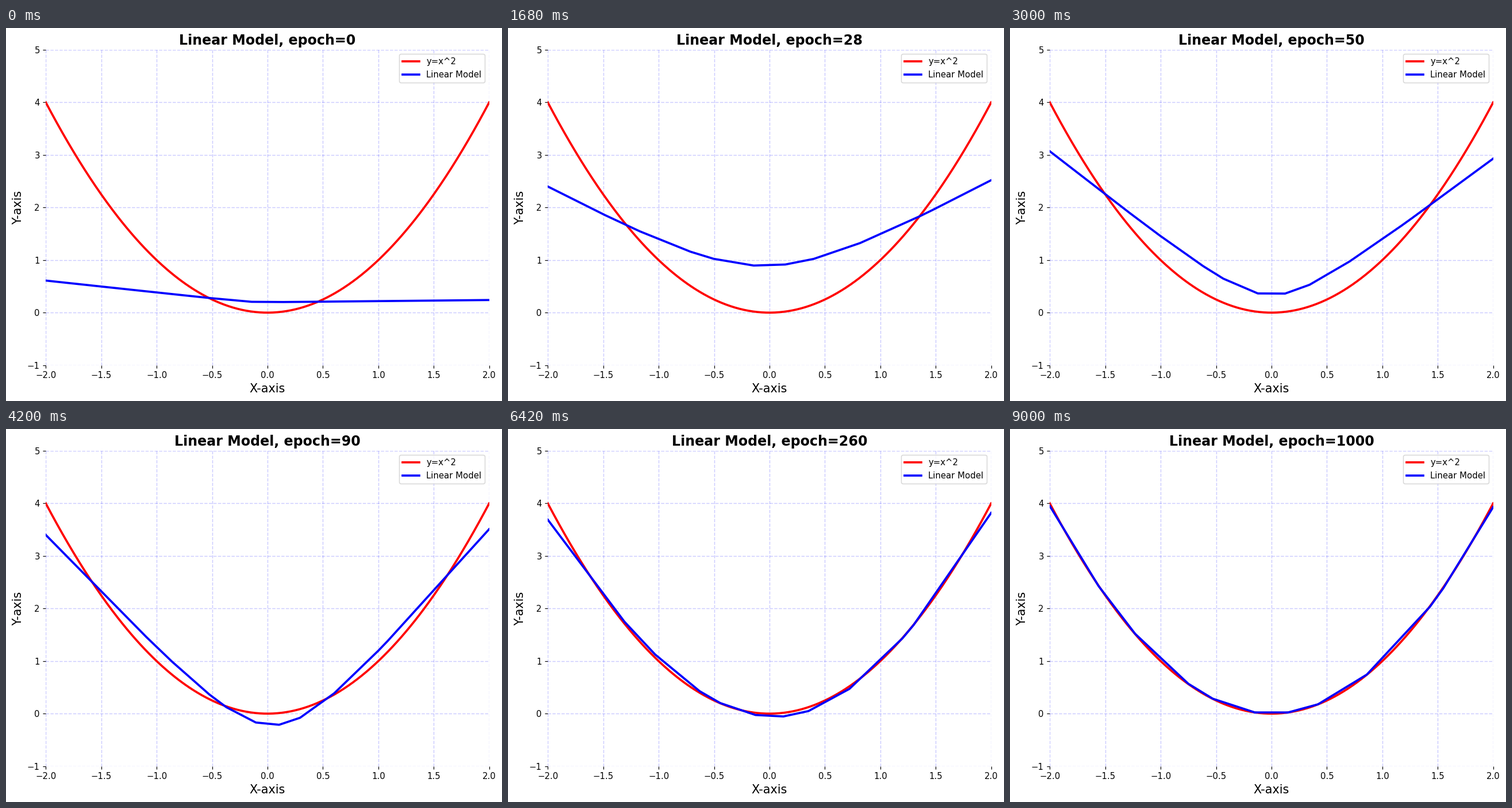
A matplotlib script that plays this animation: 863 px wide and 649 px high, repeating every 9060 ms.

```python
import numpy as np
import matplotlib.pyplot as plt
from matplotlib.animation import FuncAnimation

W, H, DPI = 863, 649, 107
FRAMES, STEP = 151, 60

plt.rcParams["font.family"] = "DejaVu Sans"

# Shape of the fit over time: bottom height, end heights, roundness of the bend
keys = np.array([0, 28, 50, 70, 84, 107, 150])
base = [.2, .89, .335, -.22, -.11, -.06, 0]
left = [.61, 2.4, 3.07, 3.4, 3.5, 3.69, 3.95]
right = [.24, 2.52, 2.93, 3.51, 3.67, 3.82, 3.93]
bend = [.15, .85, .42, .5, 1.03, 2.05, 6]
tracks = np.column_stack([base, left, right, bend])
slopes = np.gradient(tracks, keys, axis=0, edge_order=2)

# Where the straight pieces of the fit meet once training is over
joints = np.array([-1.56, -1.23, -.75, -.53, -.15, .15, .42, .86, 1.43, 1.55])


def shape(frame):
    """Cubic Hermite interpolation of the tracks."""
    k = min(np.searchsorted(keys, frame, side="right"), len(keys) - 1) - 1
    h = keys[k + 1] - keys[k]
    t = (frame - keys[k]) / h
    s = t * t * (3 - 2 * t)
    return (tracks[k] * (1 - s) + tracks[k + 1] * s
            + h * t * (1 - t) * (slopes[k] * (1 - t) - slopes[k + 1] * t))


def fit(frame):
    """Straight pieces along a hyperbola that opens into a parabola."""
    low, lhs, rhs, r = shape(frame)
    centre = np.interp(frame, [28, 84, 150], [-.05, .08, 0])
    spread = np.interp(frame, [28, 70, 150], [.95, .7, 1])
    x = np.concatenate([[-2], joints * spread, [2]])

    def arm(u):
        return np.hypot(u, r) - r

    rise = np.where(x < centre, (lhs - low) / arm(2 + centre),
                    (rhs - low) / arm(2 - centre))
    return x, low + rise * arm(x - centre)


def epoch(frame):
    """Training steps are shown ever more sparsely."""
    return int(np.interp(frame, [0, 50, 75, 115, 150],
                         [0, 50, 100, 300, 1000]) + .5)


fig = plt.figure(figsize=((W + .001) / DPI, (H + .001) / DPI), dpi=DPI,
                 facecolor="white")
ax = fig.add_axes([69.25 / W, 1 - 586.7 / H, 771.4 / W, 548.7 / H])
ax.set(xlim=(-2, 2), ylim=(-1, 5))
ax.set_xlabel("X-axis", fontsize=14)
ax.set_ylabel("Y-axis", fontsize=14)
ax.grid(color="blue", alpha=.2, linestyle="--", linewidth=1)
ax.spines[:].set_visible(False)

x = np.linspace(-2, 2, 401)
ax.plot(x, x ** 2, color="red", lw=2.5, label="y=x^2")
model, = ax.plot(*fit(0), color="blue", lw=2.5, label="Linear Model")
ax.legend(loc="upper right", fontsize=10)
title = ax.set_title("", fontsize=16, fontweight="bold")


def update(frame):
    model.set_data(*fit(frame))
    title.set_text(f"Linear Model, epoch={epoch(frame)}")
    return model, title


anim = FuncAnimation(fig, update, frames=FRAMES, interval=STEP,
                     repeat=True, repeat_delay=0, blit=False)
plt.show()
```
